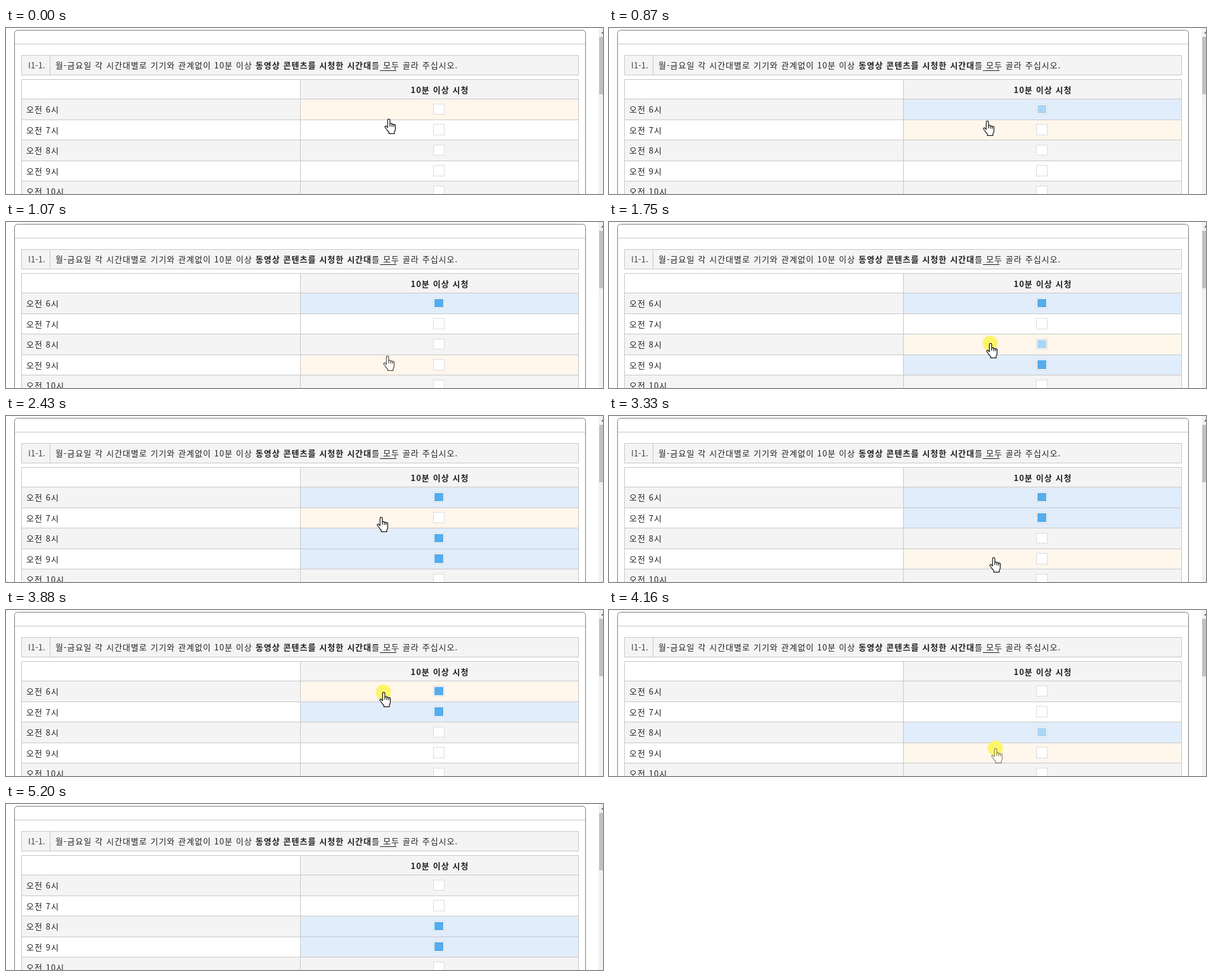
An HTML page for the animation above (5.6 s loop, 942 by 263 pixels).

```html
<!DOCTYPE html>
<html lang="ko">
<head>
<meta charset="utf-8">
<title>시간대 선택</title>
<style>
html, body { margin: 0; width: 100%; height: 100%; overflow: hidden; background: #fff; }
svg { display: block; width: 942px; height: 263px; }
text {
  font: 13px "Noto Sans CJK KR", "Noto Sans CJK", sans-serif;
  letter-spacing: 1px; word-spacing: .3px; fill: #222; white-space: pre;
}
.b { font-weight: 700; }
.code { letter-spacing: .1px; fill: #444; }
.line { fill: none; stroke: #c8c8c8; }
</style>
</head>
<body>
<svg id="stage" viewBox="0 0 942 263"></svg>
<script>
const LOOP = 5600, TICK = 68.4, FIRST_TICK = 99;
const GREY = '#f4f4f4', HOVER = '#fff6ec', PICKED = '#e1edfb';
const TOP = 112, PITCH = 32.5;
const stage = document.getElementById('stage');

function add(name, attrs, content) {
  const el = document.createElementNS('http://www.w3.org/2000/svg', name);
  for (const k in attrs) el.setAttribute(k, attrs[k]);
  if (content) el.innerHTML = content;
  return stage.appendChild(el);
}
const box = (x, y, width, height, fill) => add('rect', { x, y, width, height, fill });
const line = d => add('path', { d, class: 'line' });
const label = (x, y, content, more) => add('text', { x, y, ...more }, content);

// page frame and question
add('rect', { x: 13.5, y: 3.5, width: 901, height: 300, rx: 5, fill: '#fff', stroke: '#7c7c7c' });
line('M14 25.5H914');
box(24, 43, 880, 32, GREY);
line('M24.5 43.5H903.5V74.5H24.5ZM69.5 43V75');
label(35, 64, 'I1-1.', { class: 'code' });
label(78, 64, '월-금요일 각 시간대별로 기기와 관계없이 10분 이상 ' +
  '<tspan class="b">동영상 콘텐츠를 시청한 시간대</tspan>를 모두 골라 주십시오.');
box(590, 67, 26, 1, '#222');

// table
box(465, 82, 439, 30, GREY);
label(684.5, 103, '10분 이상 시청', { class: 'b', 'text-anchor': 'middle' });

const rowTop = i => Math.round(TOP + PITCH * i);
const rows = Array.from({ length: 5 }, (_, i) => {
  const top = rowTop(i), height = rowTop(i + 1) - top;
  const base = i % 2 ? '#fff' : GREY;
  const y0 = Math.round(TOP + PITCH * i + 7.75), y1 = Math.round(TOP + PITCH * i + 25.25);
  box(24, top, 440, height, base);
  const cell = box(464, top, 440, height, base);
  label(32, Math.floor(top + height / 2) + 6, `오전 ${i + 6}시`);
  add('rect', { x: 674.5, y: y0 + .5, width: 17, height: y1 - y0 - 1, fill: '#fff', stroke: '#dcdcdc' });
  const mark = box(676, y0 + 2, 14, y1 - y0 - 4, '#55acee');
  return { base, cell, mark, flips: [] };
});
line('M24.5 263V81.5H903.5V263M464.5 81V263' +
  rows.map((_, i) => `M24 ${rowTop(i) + .5}H904`).join(''));

// scrollbar
box(935, 0, 7, 263, '#f1f1f1');
box(936, 14, 6, 91, '#c1c1c1');
add('path', { d: 'M939 8.5L942.5 5V8.5Z', fill: '#505050' });

// pointer, both shapes with the hot spot at 0,0
const halo = add('circle', { r: 12, fill: '#fcf56a' });
const hand = add('path', {
  d: 'M-1.8 14V2.2a1.8 1.8 0 0 1 3.6 0V8.6a1.6 1.6 0 0 1 3.2 .4a1.5 1.5 0 0 1 2.8 .8' +
     'a1.4 1.4 0 0 1 2.6 1.2V16q0 2.5-1.6 4.5V23.4H.2V21Q-2.6 18.5-3.8 16L-6.2 13' +
     'Q-6.2 11-4.4 11.2Q-3.2 11.8-1.8 14M1.8 8.6V12M5 9.2V12.4M7.8 10V12.8',
  fill: '#fff', stroke: '#111', 'stroke-width': 1.2, 'stroke-linejoin': 'round'
});
const arrow = add('path', {
  d: 'M.5 .5V16.5L4.2 13L6.7 18.6L9.1 17.5L6.7 12.1H11.6Z', fill: '#fff', stroke: '#111'
});

// pointer strokes in ticks: from, to, x, y
const origin = [604, 144];
const strokes = [
  [-1, 3, 596, 139], [10, 15, 603, 220], [18, 20, 602, 192], [24, 29, 592, 156],
  [33, 34, 592, 160], [38, 43, 608, 232], [46, 52, 596, 130], [56, 60, 612, 235],
  [66, 70, 926, 252], [72, 74, 928, 264]
];
const presses = [[10, 11], [16, 18], [23, 25], [37, 43], [55, 63]];

const clamp = v => Math.min(1, Math.max(0, v));
const smooth = p => p * p * (3 - 2 * p);
const pressed = n => presses.some(([a, b]) => n >= a && n < b);
const onTable = x => x > 464 && x < 904;
const rowAt = ([x, y]) => onTable(x) ? Math.floor((y - TOP) / PITCH) : -1;

function tip(n) {
  return strokes.reduce(([x, y], [from, to, tx, ty]) => {
    const k = smooth(clamp((n - from) / (to - from)));
    return [x + (tx - x) * k, y + (ty - y) * k];
  }, origin).map(Math.round);
}

// every row entered while the button is down flips once
for (let n = 0, last = -1; n * TICK < LOOP; n++) {
  const row = pressed(n) ? rowAt(tip(n)) : -1;
  if (row >= 0 && row !== last) rows[row].flips.push(n);
  last = row;
}

const show = (el, on) => el.setAttribute('visibility', on ? 'visible' : 'hidden');
const move = (el, x, y) => el.setAttribute('transform', `translate(${x} ${y})`);

function draw(t) {
  const n = Math.floor((t - FIRST_TICK) / TICK);
  const [x, y] = tip(n), [px, py] = tip(n - 1);
  const hovered = rowAt([x, y]);

  rows.forEach((r, i) => {
    const past = r.flips.filter(f => f <= n);
    const on = past.length % 2;
    const fade = past.length ? clamp((n - past[past.length - 1]) / 2) : 1;
    r.mark.setAttribute('opacity', on ? fade : 1 - fade);
    r.cell.setAttribute('fill', i === hovered ? HOVER : on ? PICKED : r.base);
  });

  // a fast hand looks paler
  const speed = Math.hypot(x - px, y - py);
  hand.setAttribute('opacity', Math.max(.47, 1 - speed * speed / 1600));
  move(hand, x, y);
  move(arrow, x, y);
  move(halo, x - .5, y);
  show(hand, onTable(x));
  show(arrow, !onTable(x));
  show(halo, pressed(n));
}

const begin = performance.now();
function frame() {
  draw((performance.now() - begin) % LOOP);
  requestAnimationFrame(frame);
}
frame();
</script>
</body>
</html>
```
